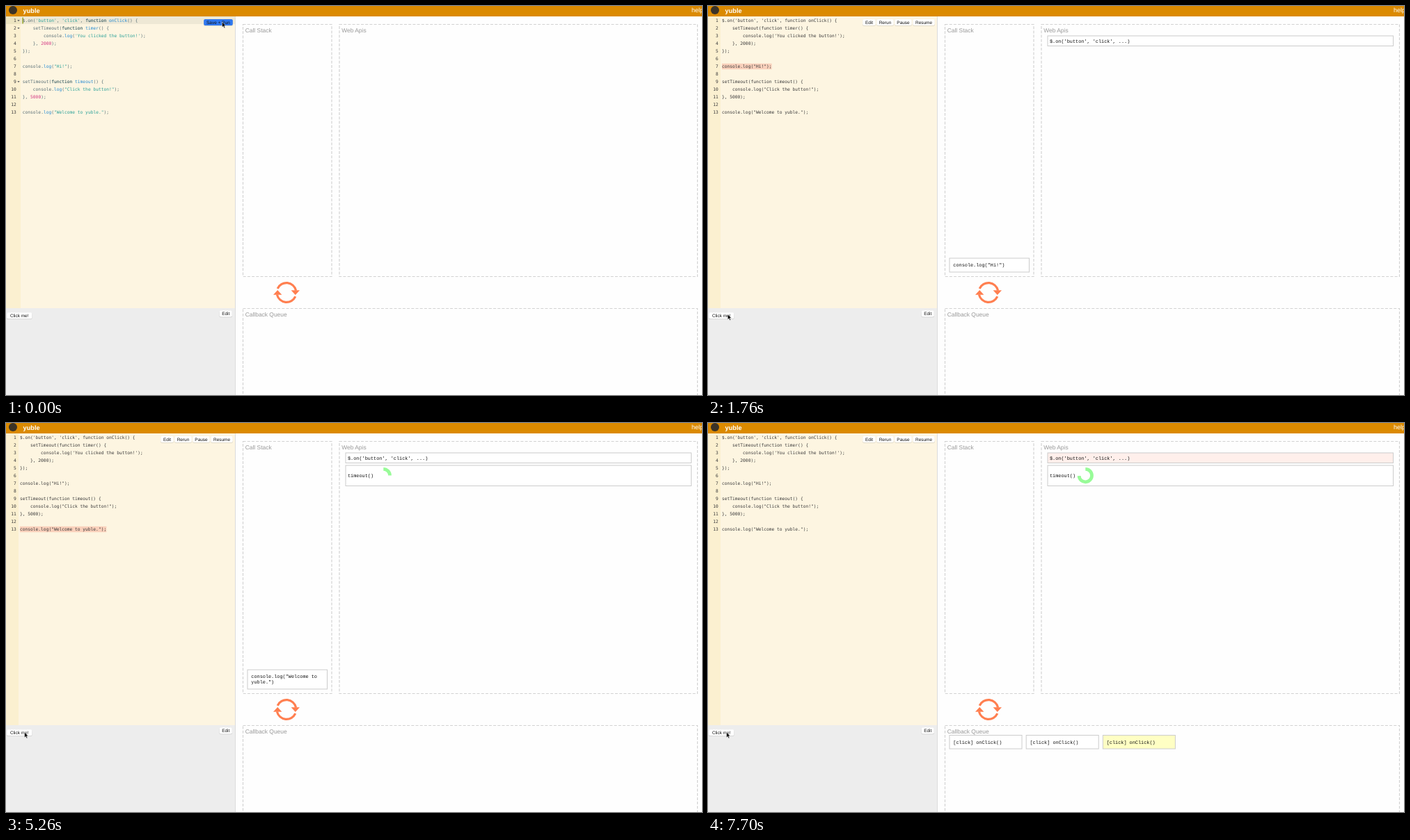
Recreate the animation shown at these times as an HTML page. Size 1000 px wide and 560 px high, loop 8000 ms.

```html
<!DOCTYPE html>
<html lang="en">
<head>
<meta charset="utf-8">
<title>Event loop</title>
<style>
  html, body { margin: 0; width: 100%; height: 100%; overflow: hidden; background: #fefefe; }
  svg { display: block; width: 100vw; height: 100vh; }
  text { white-space: pre; text-rendering: geometricPrecision; font-family: "Liberation Sans", Arial, sans-serif; }
  .code { font: 6.26px "DejaVu Sans Mono", monospace; fill: #3a3a3a; }
  .call { font: 6.86px "Liberation Mono", "Courier New", monospace; fill: #111; }
  .label { font-size: 8.44px; fill: #999; }
  .button { font-size: 6.45px; fill: #111; }
  .box { fill: #fff; stroke: #ccc; }
  .zone { fill: none; stroke: #d2d2d2; stroke-width: 1.2; stroke-dasharray: 4 2.2; }
</style>
</head>
<body>
<svg id="stage" viewBox="0 0 1000 560"></svg>
<script>
const LOOP = 8000, CHAR = 3.768, LINE = 11;
const stage = document.getElementById('stage');

function add(parent, tag, attrs = {}, content) {
  const el = document.createElementNS('http://www.w3.org/2000/svg', tag);
  for (const key in attrs) el.setAttribute(key, attrs[key]);
  if (content !== undefined) el.textContent = content;
  return parent.appendChild(el);
}
const rect = (p, x, y, width, height, fill, more) => add(p, 'rect', { x, y, width, height, fill, ...more });
const text = (p, x, y, cls, content, more) => add(p, 'text', { x, y, class: cls, ...more }, content);
const group = () => add(stage, 'g');
const show = (el, on) => { el.style.display = on ? '' : 'none'; };

const source = [
  "$.on('button', 'click', function onClick() {",
  '    setTimeout(function timer() {',
  "        console.log('You clicked the button!');",
  '    }, 2000);',
  '});',
  '',
  'console.log("Hi!");',
  '',
  'setTimeout(function timeout() {',
  '    console.log("Click the button!");',
  '}, 5000);',
  '',
  'console.log("Welcome to yuble.");'
];

// Statements on the call stack: time on, time off, first line, line count, wrapped text
const calls = [
  [210, 990, 0, 5, ["$.on('button', 'click',", 'function onClick() {', 'setTimeout(function', 'timer() {',
    "console.log('You clicked", "the button!'); }, 2000);", '})']],
  [1760, 2510, 6, 1, ['console.log("Hi!")']],
  [3230, 4000, 8, 3, ['setTimeout(function', 'timeout() {', 'console.log("Click the', 'button!"); }, 5000)']],
  [4730, 5440, 12, 1, ['console.log("Welcome to', 'yuble.")']]
];

// Moments at which the screen refreshes
const ticks = [0, 210, 540, 780, 990, 1170, 1470, 1760, 1940, 2150, 2510, 3230, 3620, 4000, 4180,
  4450, 4630, 4730, 5040, 5240, 5440, 5610, 5810, 6010, 6210, 6410, 6590,
  6770, 6950, 7140, 7330, 7520, 7700];

const pointer = [[0, 310.5, 23], [210, 304, 29], [540, 238, 170], [780, 120, 366.5], [990, 62, 436],
  [1170, 52, 443.5], [1470, 28.3, 443.8], [1940, 27.5, 445], [3620, 26.6, 445.2]];

const presses = [6770, 7140, 7520], PRESS = 180, FADE = 360;

function button(parent, x, y, w, label, fill = '#fff') {
  const g = add(parent, 'g');
  rect(g, x, y + 0.5, w, 9.2, '#000', { rx: 2, opacity: 0.14 });
  const face = rect(g, x + 0.2, y, w - 0.4, 9, fill, { rx: 2 });
  text(g, x + w / 2, y + 6.9, 'button', label, { 'text-anchor': 'middle' });
  return face;
}

function callBox(parent, x, y, w, h, lines) {
  const box = rect(parent, x, y, w, h, '#fff', { class: 'box' });
  lines.forEach((line, i) => text(parent, x + 5.3, y + 12 + i * 7.85, 'call', line));
  return box;
}

function highlighted(parent, line, x, y) {
  const row = text(parent, x, y, 'code');
  const token = /('[^']*'|"[^"]*")|(\d+)|(function\b)|(log|onClick|timer|timeout)(?=\()/g;
  const colors = ['#2aa198', '#d33682', '#073642', '#268bd2'];
  let last = 0;
  const put = (s, fill) => s && add(row, 'tspan', { fill }, s);
  for (const m of line.matchAll(token)) {
    put(line.slice(last, m.index), '#586e75');
    put(m[0], colors[m.slice(1).findIndex(Boolean)]);
    last = m.index + m[0].length;
  }
  put(line.slice(last), '#586e75');
}

// Page frame
rect(stage, 0, 0, 1000, 560, '#fefefe');
rect(stage, 0, 15, 329, 420, '#fdf5e1');
rect(stage, 0, 435, 329, 125, '#ededed');
rect(stage, 329, 15, 1, 545, '#dcdcdc');
rect(stage, 0, 0, 1000, 15, '#db8a00');
add(stage, 'circle', { cx: 10, cy: 6, r: 6, fill: '#3b3326' });
text(stage, 24.6, 9.7, '', 'yuble', { fill: '#fff', 'font-size': 9.2, 'font-weight': 700 });
text(stage, 985, 9.3, '', 'help', { fill: '#fff', 'font-size': 9 });
[[340.5, 26.5, 127.5, 363, 'Call Stack'], [479, 26.5, 514.5, 363, 'Web Apis'], [340.5, 435.5, 653, 140, 'Callback Queue']]
  .forEach(([x, y, width, height, label]) => {
    add(stage, 'rect', { x, y, width, height, class: 'zone' });
    text(stage, x + 3.2, y + 11, 'label', label);
  });

// Loop icon
const arc = 'M390.2 406.8A14 14 0 0 1 416.6 409.5';
for (const turn of [0, 180]) {
  const half = add(stage, 'g', { transform: `rotate(${turn} 403 412.5)` });
  add(half, 'path', { d: arc, fill: 'none', stroke: '#ff7f50', 'stroke-width': 3.2 });
  add(half, 'path', { d: 'M409.6 409.2H422L415.8 416Z', fill: '#ff7f50' });
}

// Editor before the run
const edit = group();
rect(edit, 0, 15, 21, 420, '#fbf0d0');
rect(edit, 0, 15, 21, 11, '#ede5c1');
rect(edit, 21, 15, 308, 11, '#eee8d5');
rect(edit, 23.5, 16.5, 1.2, 9, '#859900');
[0, 1, 8].forEach(i => add(edit, 'path', { d: `M16.3 ${20 + i * LINE}h3.4l-1.7 2.2z`, fill: '#666' }));
source.forEach((line, i) => highlighted(edit, line, 23.8, 23.1 + i * LINE));
button(edit, 284, 19, 42, 'Save + Run', '#2f78f0');

// Editor during the run
const run = group();
rect(run, 0, 15, 18, 420, '#fbf0d0');
const marks = calls.map(([, , first, count]) => {
  const g = add(run, 'g');
  for (let i = first; i < first + count; i++) {
    const chars = source[i].length + (i === 2 ? 4 : 0);
    rect(g, 20, 16.8 + i * LINE, chars * CHAR, 8.4, '#f9d0bb');
  }
  return g;
});
source.forEach((line, i) => text(run, 20, 23.1 + i * LINE, 'code', line));
[[222, 19, 'Edit'], [242, 25, 'Rerun'], [268, 25, 'Pause'], [294, 32, 'Resume']]
  .forEach(([x, w, label]) => button(run, x, 19, w, label));

const numbers = group();
source.forEach((_, i) => text(numbers, 14.7, 23.1 + i * LINE, 'code', i + 1, { 'text-anchor': 'end' }));
button(stage, 306.5, 438.5, 18.5, 'Edit');
const clickFace = button(stage, 1, 441.2, 36.5, 'Click me!');

// Call stack
const stack = calls.map(([, , , , lines]) => {
  const g = group(), h = 12.1 + lines.length * 7.85;
  callBox(g, 347, 383 - h, 114.5, h, lines);
  return g;
});

// Web Apis
const listener = group();
const listenerBox = rect(listener, 488, 43, 496.5, 14.5, '#fff', { class: 'box' });
text(listener, 491, 52.6, 'call', "$.on('button', 'click', ...)");
const timer = group();
rect(timer, 488, 61, 496.5, 29.5, '#fff', { class: 'box' });
text(timer, 491, 77.6, 'call', 'timeout()');
const ring = add(timer, 'path', { fill: 'none', stroke: '#98fb98', 'stroke-width': 4.8 });

// Callback queue
const queue = presses.map((_, i) => {
  const g = group();
  return { g, box: callBox(g, 347 + i * 110.2, 449.5, 104, 19.5, ['[click] onClick()']) };
});

const arrow = add(stage, 'path', {
  d: 'M0 0V7.6L1.8 6L3 8.8L4.3 8.2L3.1 5.5H5.4Z', fill: '#000', stroke: '#fff', 'stroke-width': 0.5
});

function ringPath(part) {
  const a = part * 2 * Math.PI, cx = 542.3, cy = 75.6, r = 9.2;
  return `M${cx} ${cy - r}A${r} ${r} 0 ${part > 0.5 ? 1 : 0} 1 ${cx + r * Math.sin(a)} ${cy - r * Math.cos(a)}`;
}

// Flash colour fading back to white
function flash(el, age, rgb) {
  const k = age < 0 ? 0 : Math.max(0, 1 - age / FADE);
  el.style.fill = `rgb(${rgb.map(c => Math.round(255 - (255 - c) * k))})`;
}

function draw(now) {
  const t = ticks.findLast(v => v <= now);
  show(edit, t < 210);
  show(run, t >= 210);
  calls.forEach(([on, off], i) => {
    const live = t >= on && t < off;
    show(marks[i], live);
    show(stack[i], live);
  });
  show(listener, t >= 990);
  show(timer, t >= 4000);
  ring.setAttribute('d', t > 4000 ? ringPath((t - 4000) / 5000) : '');

  const pressed = presses.some(p => t >= p && t < p + PRESS);
  clickFace.setAttribute('fill', pressed ? '#2f78f0' : '#fff');
  const ages = presses.map(p => t - p - PRESS);
  queue.forEach(({ g, box }, i) => {
    show(g, ages[i] >= 0);
    flash(box, ages[i], [255, 255, 196]);
  });
  flash(listenerBox, ages.findLast(a => a >= 0) ?? -1, [255, 239, 235]);

  const [, x, y] = pointer.findLast(p => p[0] <= t);
  arrow.setAttribute('transform', `translate(${x} ${y})`);
}

function frame() {
  draw(performance.now() % LOOP);
  requestAnimationFrame(frame);
}
frame();
</script>
</body>
</html>
```
